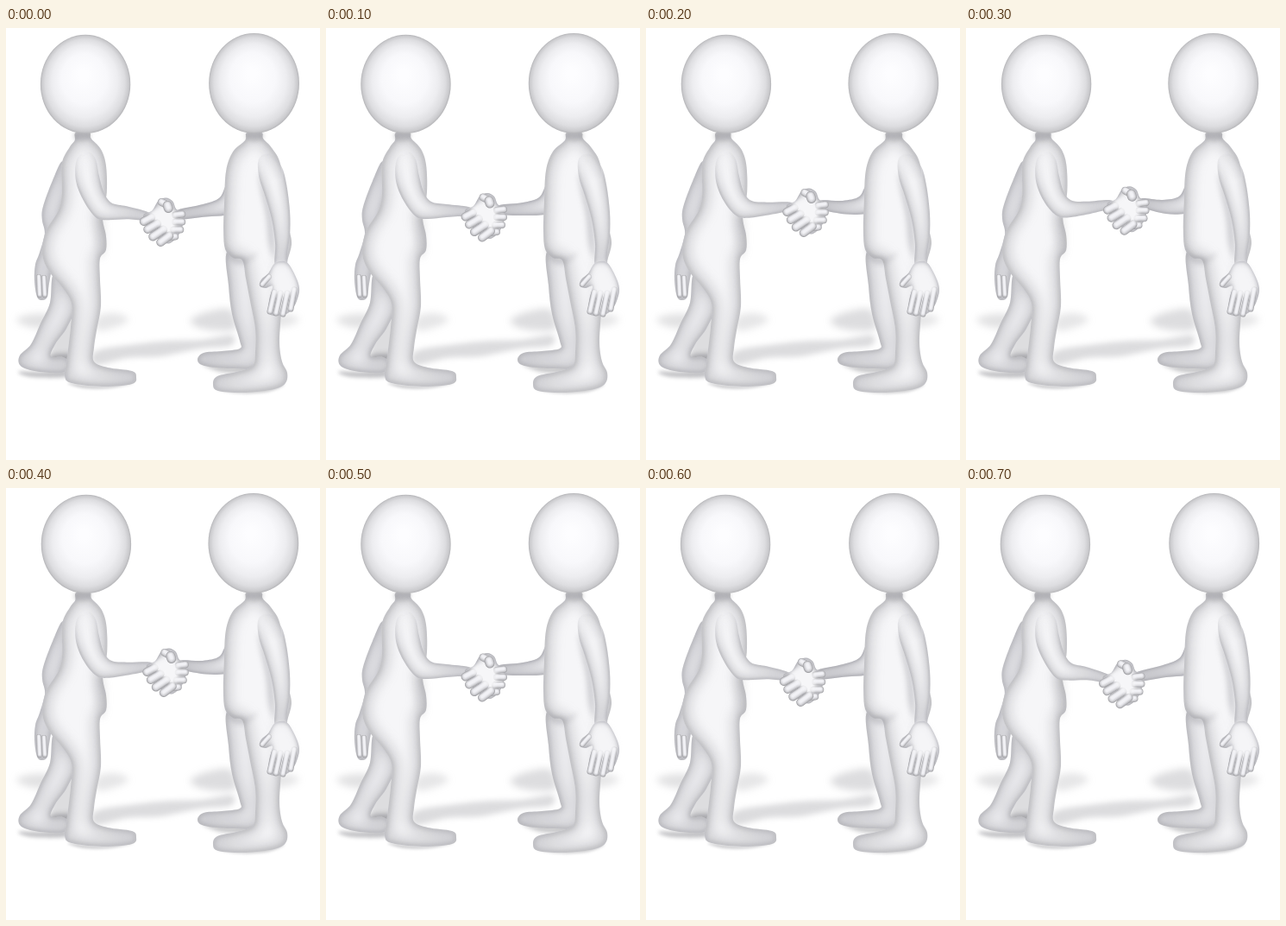
Recreate the animation shown at these times as an HTML page with a canvas. Size 364x500 px, loop 0.8 s.

```html
<!DOCTYPE html>
<html lang="en">
<head>
<meta charset="utf-8">
<title>Handshake</title>
<style>
html, body { margin: 0; width: 100%; height: 100%; overflow: hidden; background: #fff; }
canvas { display: block; width: 364px; height: 500px; }
</style>
</head>
<body>
<canvas id="stage" width="364" height="500"></canvas>
<script>
const ctx = document.getElementById('stage').getContext('2d');
const LOOP = 800, STEP = 100;
const LIGHT = '246,246,248', EDGE = '122,122,130';
let lean = 0;

// Closed smooth curve through "x,y x,y ..."; the upper body leans a little.
function smooth(text) {
  const pts = text.split(' ').map(pair => {
    const [x, y] = pair.split(',').map(Number);
    return [x + lean * Math.max(0, 1 - y / 330), y];
  });
  const n = pts.length, at = i => pts[(i + n) % n];
  const path = new Path2D();
  path.moveTo(...pts[0]);
  for (let i = 0; i < n; i++) {
    const [a, b, c, d] = [at(i - 1), at(i), at(i + 1), at(i + 2)];
    path.bezierCurveTo(
      b[0] + (c[0] - a[0]) / 6, b[1] + (c[1] - a[1]) / 6,
      c[0] - (d[0] - b[0]) / 6, c[1] - (d[1] - b[1]) / 6, c[0], c[1]);
  }
  path.closePath();
  return path;
}

function paint(rgb, alpha, fade) {
  if (!fade) return `rgba(${rgb},${alpha})`;
  const g = ctx.createLinearGradient(...fade);
  g.addColorStop(0, `rgba(${rgb},0)`);
  g.addColorStop(1, `rgba(${rgb},${alpha})`);
  return g;
}

// A rounded body part: light fill with soft shading along its rim.
function part(text, { base = LIGHT, rim = 10, depth = 0.5, fade } = {}) {
  const path = smooth(text);
  ctx.save();
  ctx.fillStyle = paint(base, 1, fade);
  ctx.fill(path);
  ctx.clip(path);
  for (const [width, blur, alpha] of [[rim * 1.8, rim * 0.7, 0.45], [rim * 0.5, rim * 0.25, 0.5]]) {
    ctx.filter = `blur(${blur}px)`;
    ctx.lineWidth = width;
    ctx.strokeStyle = paint(EDGE, alpha * depth * 1.3, fade);
    ctx.stroke(path);
  }
  ctx.restore();
}

function soft(text, rgb, alpha, blur) {
  ctx.save();
  ctx.filter = `blur(${blur}px)`;
  ctx.fillStyle = `rgba(${rgb},${alpha})`;
  ctx.fill(smooth(text));
  ctx.restore();
}

function head(x, y, rx, ry) {
  ctx.save();
  ctx.translate(x + lean, y);
  ctx.scale(rx, ry);
  const g = ctx.createRadialGradient(-0.05, -0.2, 0.1, 0, 0, 1);
  [[0, 253], [0.45, 248], [0.7, 237], [0.87, 221], [0.96, 202], [1, 181]]
    .forEach(([at, v]) => g.addColorStop(at, `rgb(${v},${v},${v + 3})`));
  ctx.fillStyle = g;
  ctx.beginPath();
  ctx.arc(0, 0, 1, 0, 7);
  ctx.fill();
  ctx.restore();
}

function finger(x1, y1, x2, y2, w) {
  ctx.lineCap = 'round';
  [[1, 164], [0.86, 194], [0.7, 215], [0.52, 232], [0.32, 242]].forEach(([k, v], i) => {
    ctx.strokeStyle = `rgb(${v},${v},${v + 4})`;
    ctx.lineWidth = w * k;
    ctx.beginPath();
    ctx.moveTo(x1, y1 - i * 0.25);
    ctx.lineTo(x2, y2 - i * 0.25);
    ctx.stroke();
  });
}

function ground() {
  soft('12,338 32,331 58,334 58,346 32,347', '150,150,155', 0.28, 4);
  soft('54,345 74,335 84,352 78,382 54,383', '150,150,155', 0.32, 3);
  soft('106,334 126,330 142,337 130,345 106,350', '150,150,155', 0.24, 4);
  soft('104,374 150,366 190,362 225,361 262,356 260,368 225,371 180,380 140,382 104,390', '140,140,146', 0.3, 3);
  soft('214,338 232,329 260,326 266,348 242,350 222,346', '150,150,155', 0.32, 4);
  soft('300,340 322,331 340,338 318,346', '150,150,155', 0.24, 4);
  soft('48,380 75,378 75,390 50,388', '90,90,96', 0.45, 3);
  soft('14,398 40,398 70,396 68,404 30,404', '120,120,126', 0.45, 2);
  soft('228,388 262,392 290,386 286,398 250,398', '110,110,116', 0.4, 2.5);
  soft('72,411 110,414 148,411 120,417 90,417', '120,120,126', 0.35, 1.5);
  soft('244,418 280,420 322,412 305,421 270,423', '120,120,126', 0.35, 1.5);
}

function leftFigure(c) {
  lean = 0.6 * c;
  part('66,154 54,177 43,207 42,222 45,238 39,260 34,274 33,292 36,311 42,315 48,311 50,296 56,262 62,220 72,180',
    { base: '236,236,240', rim: 8 });
  finger(38, 288, 39, 309, 6);
  finger(44, 289, 45, 309, 6);
  part('56,285 51,318 40,342 29,366 16,379 16,390 28,396 50,399 68,398 74,388 66,381 52,380 57,366 71,346 80,318',
    { base: '240,240,243', rim: 9 });
  part('81,121 97,121 99,128 110,140 116,158 117,190 112,218 116,240 116,257 109,267 109,290 110,322 105,350 102,370 102,386 118,393 146,397 151,404 146,412 112,415 76,411 68,403 70,388 75,346 76,319 66,301 53,286 44,270 42,254 47,234 61,211 65,192 65,157 74,138 80,130',
    { rim: 10 });
  soft('104,217 114,222 115,258 109,266 105,246', EDGE, 0.17, 4);
  soft('80,122 97,122 97,128 88,131 80,128', EDGE, 0.35, 2.5);
  head(92.5, 65, 52.2, 57.2);
}

function leftArm(c) {
  const e = -1.6 * c, h = -7.8 * c, dx = 2.5 * c;
  part(`82,152 95,143 104,152 108,171 113,189 122,${201 + e} 140,${204 + e * 2} ${165 + dx},${207 + h} ` +
    `${171 + dx},${213 + h} ${164 + dx},${217 + h} 140,${219 + e * 2} 117,${221 + e} 104,${218 + e} 90,200 81,177`,
    { rim: 7, fade: [86, 145, 96, 185] });
}

function rightArm(c) {
  const h = -7.8 * c, dx = 2.5 * c;
  part(`264,174 255,182 247,${196 - c} 228,${202 - c * 3} ${201 + dx},${205 + h} ` +
    `${196 + dx},${211 + h} ${203 + dx},${216 + h} 232,${217 - c * 2} 254,${216 - c} 268,211`,
    { base: '238,238,241', rim: 6.5, depth: 0.6 });
}

function rightFigure(c) {
  lean = -0.5 * c;
  part('257,258 258,298 262,331 271,362 271,371 250,374 229,376 222,384 230,391 262,394 292,390 296,350 290,270',
    { base: '238,238,241', rim: 9 });
  rightArm(c);
  part('279,121 296,121 298,128 308,139 318,158 322,200 328,232 331,250 326,270 322,292 319,330 317,364 320,386 326,399 324,411 311,418 278,422 246,420 240,412 245,403 267,398 286,391 289,374 289,348 283,316 278,290 274,269 263,266 254,256 252,234 253,200 255,165 263,143 277,130',
    { rim: 10 });
  soft('279,122 297,122 297,128 288,131 279,128', EDGE, 0.35, 2.5);
  soft('254,252 265,264 278,266 292,260 278,272 262,270', EDGE, 0.28, 3);
  soft('293,168 301,188 309,222 311,265 305,250 302,218 296,190', EDGE, 0.35, 3);
  part('293,151 306,146 319,160 325,181 329,213 329,240 326,261 325,275 312,275 312,250 308,222 300,194 293,172',
    { rim: 7, fade: [294, 146, 304, 180] });
  part('312,272 325,271 334,284 340,301 337,316 332,325 325,331 313,333 305,330 305,315 309,299 301,301 294,298 296,291 304,284',
    { rim: 7, depth: 0.55 });
  finger(297, 297, 305, 288, 6);
  finger(311, 306, 306, 328, 7);
  finger(318, 307, 313, 330, 7);
  finger(326, 307, 321, 331, 7);
  finger(334, 303, 330, 325, 7);
  soft('309,276 326,274 336,293 334,306 312,308', LIGHT, 0.9, 3);
  head(287.2, 64, 52.4, 58);
}

function hands(c) {
  lean = 0;
  ctx.save();
  ctx.translate(2.5 * c, -7.8 * c);
  part('161,211 171,206 178,195 187,191 195,195 199,204 207,209 207,221 202,234 190,244 175,236 165,225',
    { rim: 5, depth: 0.6 });
  [[198, 211, 206, 210], [198, 219, 206, 219], [196, 228, 204, 228], [190, 237, 198, 236]]
    .forEach(f => finger(...f, 8));
  [[161.5, 218.5, 170, 214], [166, 227.5, 177, 221], [172, 236, 184, 228], [181, 242.5, 191, 235]]
    .forEach(f => finger(...f, 10));
  soft('168,210 180,203 194,207 198,218 194,232 184,227 176,218', LIGHT, 0.95, 2);
  finger(182, 196, 188, 199, 9);
  finger(189, 200, 190, 203, 11);
  ctx.restore();
}

function draw(step) {
  const c = Math.cos(2 * Math.PI * (step * STEP - 300) / LOOP);
  lean = 0;
  ctx.fillStyle = '#fff';
  ctx.fillRect(0, 0, 364, 500);
  ground();
  leftFigure(c);
  rightFigure(c);
  lean = 0;
  leftArm(c);
  hands(c);
}

let shown = -1;
const start = performance.now();
function tick(now) {
  const step = Math.floor(Math.max(0, now - start) % LOOP / STEP);
  if (step !== shown) draw(shown = step);
  requestAnimationFrame(tick);
}
tick(start);
</script>
</body>
</html>
```
